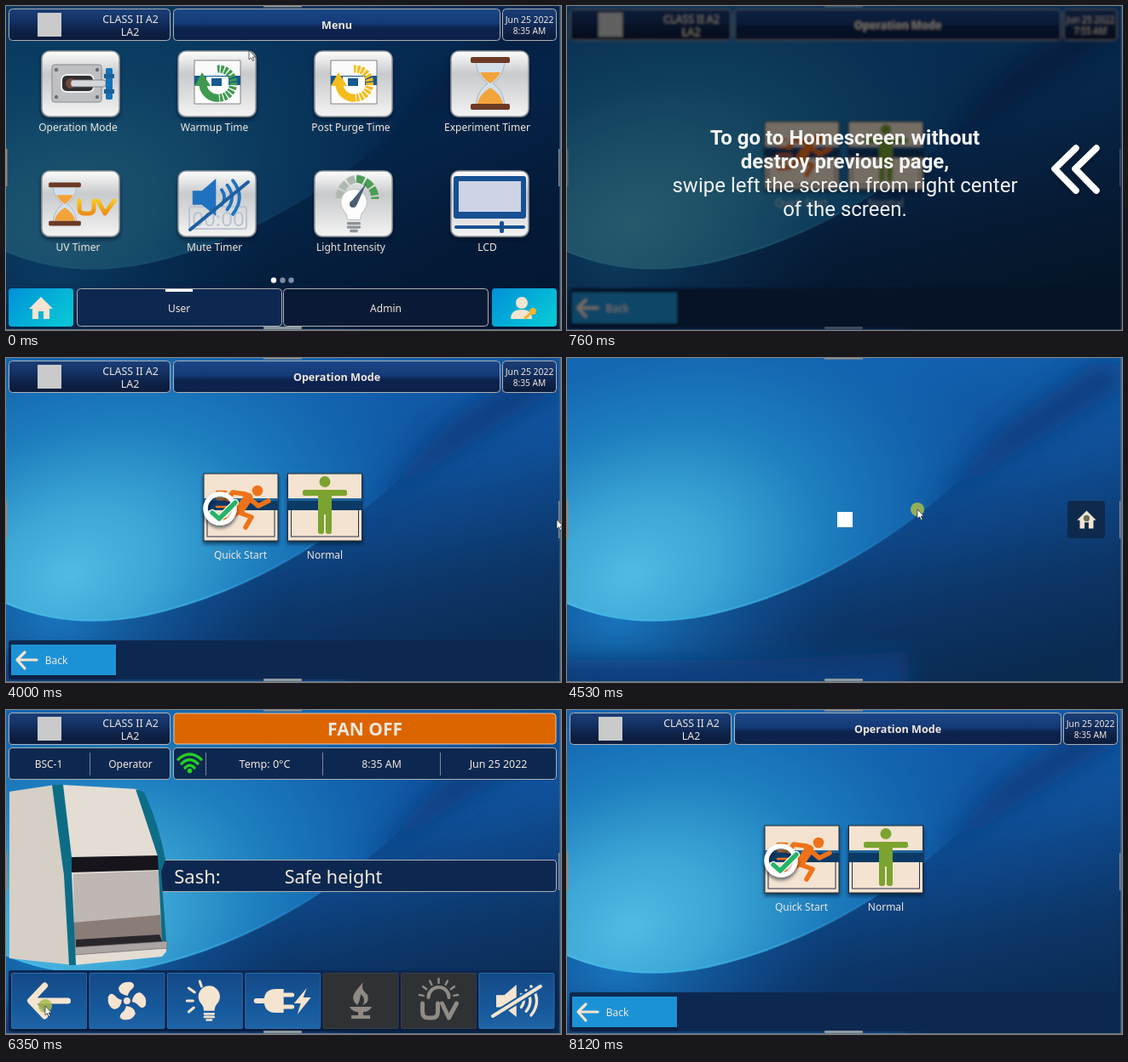
These frames come from a looping animation (651 px wide and 381 px high, 8.97 s). An HTML page:

```html
<!DOCTYPE html>
<html lang="en">
<head>
<meta charset="utf-8">
<title>Cabinet touch panel</title>
<style>
html, body { margin: 0; width: 100%; height: 100%; overflow: hidden; background: #0b2c55; }
svg { display: block; width: 651px; height: 381px; }
text { font-family: "Noto Sans", sans-serif; fill: #f1e8dc; white-space: pre; }
.message text { font-family: Roboto, sans-serif; fill: #f4f4f4; }
.line { fill: none; stroke-linecap: round; stroke-linejoin: round; }
</style>
</head>
<body>
<svg id="stage" viewBox="0 0 651 381" xmlns="http://www.w3.org/2000/svg"></svg>
<script>
const LOOP = 8970;
const CREAM = '#f5e4cf', NAVY = '#0d2850', BOLD = 'font-weight="700"';

// Drawing helpers, each returning SVG markup
const rect = (x, y, w, h, fill, extra = '') =>
  `<rect x="${x}" y="${y}" width="${w}" height="${h}" fill="${fill}" ${extra}/>`;
const circle = (x, y, r, fill, extra = '') => `<circle cx="${x}" cy="${y}" r="${r}" fill="${fill}" ${extra}/>`;
const shape = (d, fill, extra = '') => `<path d="${d}" fill="${fill}" ${extra}/>`;
const line = (d, color, width, extra = '') =>
  `<path class="line" d="${d}" stroke="${color}" stroke-width="${width}" ${extra}/>`;
const text = (x, y, s, size = 12, extra = '') =>
  `<text x="${x}" y="${y}" font-size="${size}" text-anchor="middle" ${extra}>${s}</text>`;
const group = (x, y, s, body) => `<g transform="translate(${x} ${y}) scale(${s})">${body}</g>`;
const panel = (x, y, w, h, fill = 'url(#bar)') =>
  rect(x + .5, y + .5, w - 1, h - 1, fill, 'rx="4" stroke="#aeb0b4"');
const gradient = (id, stops, attrs = 'x1="0" y1="0" x2="0" y2="1"', kind = 'linear') =>
  `<${kind}Gradient id="${id}" ${attrs}>` +
  stops.map(([o, c, a = 1]) => `<stop offset="${o}" stop-color="${c}" stop-opacity="${a}"/>`).join('') +
  `</${kind}Gradient>`;

const defs = `<defs>
${gradient('base', [[0, '#1267b8'], [.45, '#0f4f97'], [.75, '#0c3668'], [1, '#0a2a50']], 'x1=".35" y1="0" x2=".75" y2="1"')}
${gradient('glow', [[0, '#50bbe2'], [.25, '#3ba5d5'], [.52, '#1e7fbf'], [.78, '#1467b0', .9], [1, '#1262b2', 0]],
  'gradientUnits="userSpaceOnUse" cx="0" cy="0" r="1" gradientTransform="translate(75 255) rotate(-25) scale(450 310)"', 'radial')}
${gradient('rim', [[0, '#46b9e6'], [.5, '#38a9de', .8], [1, '#1c78c4', 0]], 'gradientUnits="userSpaceOnUse" x1="0" y1="0" x2="460" y2="0"')}
${gradient('floor', [[0, '#1a7cc4', .9], [1, '#0f4f98', 0]], 'gradientUnits="userSpaceOnUse" cx="60" cy="300" r="260"', 'radial')}
${gradient('night', [[0, '#00182a', .6], [.5, '#001428', .63], [1, '#001026', .72]], 'x1="0" y1="0" x2="1" y2=".3"')}
${gradient('bar', [[0, '#1b3f78'], [.3, '#153468'], [.7, '#0d2147'], [1, '#0b1b3b']])}
${gradient('title', [[0, '#1c4787'], [.45, '#143a76'], [.6, '#0c2350'], [1, '#0d2148']])}
${gradient('tile', [[0, '#fdfdfd'], [.35, '#c9cacc'], [.6, '#d8d9da'], [1, '#f4f4f4']])}
${gradient('aqua', [[0, '#0090d8'], [1, '#08c4d6']], 'x1="0" y1="0" x2="1" y2=".6"')}
${gradient('key', [[0, '#114a87'], [.6, '#17589b'], [1, '#1d64a6']])}
${gradient('gold', [[0, '#f7c623'], [1, '#ee8d12']])}
<filter id="soft" x="-50%" y="-90%" width="200%" height="280%"><feGaussianBlur stdDeviation="14"/></filter>
<filter id="blur"><feGaussianBlur stdDeviation="1.7"/></filter>
<filter id="shade" x="-20%" y="-20%" width="140%" height="150%"><feDropShadow dx="0" dy="3" stdDeviation="2" flood-color="#001028" flood-opacity=".65"/></filter>
</defs>`;

const RIM = 'M0 288C55 312 110 313 165 302C260 281 345 236 420 178';
const backdrop = rect(0, 0, 651, 381, 'url(#base)') +
  rect(0, 230, 340, 151, 'url(#floor)') +
  shape('M-60 420V352Q170 362 400 345V420Z', '#0b3e7c', 'filter="url(#soft)"') +
  shape(RIM + 'C480 132 545 55 610 0H0Z', 'url(#glow)') +
  line(RIM, 'url(#rim)', 2.5) +
  shape('M415 185L520 75L620 5L651 10V35Q520 115 415 185Z', '#0b3a7c', 'filter="url(#soft)" opacity=".85"');

const handles = rect(302, 0, 45, 1.5, '#95918b') + rect(302, 377, 45, 3, '#8b98a0', 'rx="1"') +
  rect(0, 168, 1.5, 44, '#95857c') + rect(648, 168, 1.5, 44, '#85909c') +
  rect(649.5, 0, 1.5, 381, '#5a7089') + rect(0, 380, 651, 1, '#66727f');

const brand = (x, y, size, color) => rect(x - size / 2, y - size / 2, size, size, color);
const device = panel(3, 3, 190, 38) + brand(51, 22, 28, '#cacaca') +
  text(146, 20, 'CLASS II A2', 12.4) + text(145.5, 35, 'LA2', 12.4);
const header = (title, time) => device + panel(196, 3, 384, 38, 'url(#title)') +
  text(388, 27, title, 12.6, BOLD) +
  panel(582, 3, 64, 38) + text(614, 20, 'Jun 25 2022', 10.4) + text(614, 33, time, 10.2);

const house = 'M-14 1L0 -13L14 1H10V13H3V4H-3V13H-10V1Z';

// Menu page
const hourglass = (x, y, s) => group(x, y, s,
  shape('M-17 -25H17Q15 -8 3 0Q15 8 17 25H-17Q-15 8 -3 0Q-15 -8 -17 -25Z', '#d3e0ea', 'stroke="#a9b4be"') +
  shape('M-12 -13H12Q9 -6 0 0Q-9 -6 -12 -13ZM0 5Q13 13 15 24H-15Q-13 13 0 5Z', '#f3a33a') +
  rect(-23, -31, 46, 7, '#6b3a24', 'rx="2"') + rect(-23, 24, 46, 7, '#6b3a24', 'rx="2"'));

const timer = (x, color) => group(x, 91, 1,
  rect(-27, -27, 54, 51, '#fbfbfb', 'stroke="#555" stroke-width=".7"') +
  rect(-27, -9, 54, 11, '#14598f') + rect(-13, -8, 26, 18, '#fff') + rect(-7, -6, 12, 9, '#14598f') +
  `<g fill="none" stroke="${color}" stroke-width="9"><path d="M-17 0A17 17 0 0 0 2 17"/>
   <path d="M3 17A17 17 0 0 0 0 -17" stroke-dasharray="3.2 1.4"/></g>` +
  shape('M-27 3L-18 -13L-8 3Z', color));

const bulb = (x, y, s, glass, cap) => group(x, y, s,
  shape('M-7 13Q-7 7 -11 3A14 14 0 1 1 11 3Q7 7 7 13Z', glass) +
  line('M-6 17H6M-6 21H6M-3 25H3', cap, 3));

const speaker = color => shape('M-22 -7H-12L3 -20V20L-12 8H-22Z', color) +
  line('M9 -8Q15 0 9 8M15 -13Q25 0 15 13M21 -18Q35 0 21 18', color, 3.5);

const menuArt = [
  rect(54, 69, 58, 44, '#bfc0c3', 'rx="3" stroke="#88898d"') +
    [59, 107].map(x => circle(x, 75, 2.2, '#6a6c70') + circle(x, 107, 2.2, '#6a6c70')).join('') +
    rect(65, 81, 38, 20, '#302d2f', 'rx="6" stroke="#eee" stroke-width="2"') + circle(76, 91, 6, '#75463a') +
    rect(76, 87, 41, 8, '#d5d7da', 'rx="3" stroke="#777" stroke-width=".8"') +
    rect(117, 73, 8, 37, '#1472b8', 'rx="2"') + rect(115, 80, 12, 5, '#1d5f98') + rect(115, 98, 12, 5, '#1d5f98'),
  timer(248, '#3f9a50'), timer(408, '#f5bd1c'), hourglass(568, 91, 1),
  hourglass(69, 233, .82) + line('M86 229V238Q86 244 92 244H97Q103 244 103 238V229M108 229L116 244L127 229', 'url(#gold)', 5),
  text(249, 259, '00:00', 24, 'font-family="DejaVu Sans Mono, monospace" style="fill:#b8c2d0"') +
    rect(215, 236, 67, 26, 'none', 'rx="3" stroke="#bcc4d2" stroke-width="2"') +
    group(243, 225, 1.1, speaker('#1f72c0')) + line('M216 263L284 207', '#1d5f9f', 4),
  `<path d="M391 226A24 24 0 0 1 411 203" fill="none" stroke="#aeb9b0" stroke-width="9" stroke-dasharray="9 2"/>
   <path d="M411 203A24 24 0 0 1 433 227" fill="none" stroke="#4b9d54" stroke-width="9" stroke-dasharray="9 2"/>` +
    `<g stroke="#b4b8bc" stroke-width=".8">${bulb(408, 237, 1.1, '#fdfdfd', '#8d9298')}</g>` +
    shape('M404 231L423 208L411 235Z', '#4a5d72') + circle(407, 233, 4, '#4a5d72'),
  rect(525, 200, 85, 50, '#165092', 'rx="3"') + rect(531, 206, 73, 36, '#cfd3e6') +
    rect(526, 258, 83, 4, '#165092', 'rx="2"') + rect(579, 253, 5, 14, '#165092', 'rx="2"')
];
const menuLabels = ['Operation Mode', 'Warmup Time', 'Post Purge Time', 'Experiment Timer',
  'UV Timer', 'Mute Timer', 'Light Intensity', 'LCD'];
const menuPage = header('Menu', '8:35 AM') + menuLabels.map((label, i) => {
  const x = 42 + i % 4 * 160, y = i < 4 ? 53 : 194;
  return rect(x, y, 91, 77, 'url(#tile)', 'rx="9" stroke="#8f9298" stroke-width="1.5" filter="url(#shade)"') +
    menuArt[i] + text(x + 42.5, y + 94, label);
}).join('') +
  [314, 324.5, 334.5].map((x, i) => circle(x, 322.5, 3.2, i ? '#7d8ea4' : '#fff')).join('') +
  rect(3, 332, 76, 45, 'url(#aqua)', 'rx="4"') + group(41, 355, 1, shape(house, CREAM)) +
  panel(83, 332, 241, 45, NAVY) + rect(187, 333, 32, 3, '#fff') + text(203, 360, 'User') +
  panel(325, 332, 241, 45, '#0a1a36') + text(445.5, 360, 'Admin') +
  rect(570, 332, 76, 45, 'url(#aqua)', 'rx="4"') + circle(605, 349, 7, CREAM) +
  shape('M592 368Q592 357 605 357Q617 357 617 368Z', CREAM) +
  line('M609 367L617 360', '#f2b32c', 3) + circle(618, 359, 4, '#f2b32c');

// Operation mode page
const modeTile = x => rect(x, 136, 87, 79, '#f3e3d0', 'stroke="#26282e" filter="url(#shade)"') +
  rect(x + 4, 172, 79, 38, 'none', 'stroke="#26304a"') +
  rect(x, 165, 87, 14, '#0c3a66') + rect(x, 165, 87, 3, '#1d639c');
const runner = circle(295, 156, 6.3, '#ee7219') +
  line('M284 164L274 179', '#ee7219', 11) +
  line('M285 165L296 174L308 168M281 160L266 158L260 166M274 182L288 187L281 199M271 182L261 190L249 191', '#ee7219', 5.5) +
  line('M247 157H258M248 166H264M247 175H263M247 184H258', '#ee7219', 2.5);
const man = circle(374, 145.5, 6.5, '#7ba32f') + rect(348, 155, 52, 7, '#7ba32f', 'rx="2.5"') +
  rect(366, 155, 16, 29, '#7ba32f', 'rx="2"') + rect(366, 178, 7, 29, '#7ba32f', 'rx="3"') +
  rect(375, 178, 7, 29, '#7ba32f', 'rx="3"');
const check = circle(251, 177, 17, 'none', 'stroke="#fff" stroke-width="5.5" filter="url(#shade)"') +
  line('M242 182L250 189L269 170', '#fff', 8) + line('M242 182L250 189L269 170', '#25b468', 5.5);
const modePage = (time, mark) => header('Operation Mode', time) +
  modeTile(232) + runner + mark + modeTile(330.5) + man +
  text(275, 236, 'Quick Start') + text(374, 236, 'Normal') +
  rect(3, 332, 643, 46, NAVY, 'rx="3"') + rect(6, 337, 123, 36, '#1f92d6', 'filter="url(#shade)"') +
  line('M36 355H13M22 346L13 355L22 365', CREAM, 3.2) + text(59, 360, 'Back');

// Home page
const cabinet = shape('M4 96L57 88L76 180L80 300L4 292Z', '#d5cfc6') +
  shape('M66 88L154 93L180 172L188 284L183 290L80 300Z', '#e4ddd4') +
  shape('M77 173L181 171V188L77 191Z', '#17151b') +
  shape('M79 193L181 189L184 275L80 283Z', '#beb7b3') +
  shape('M79 250L181 241L184 275L80 283Z', '#8a7d78') +
  shape('M82 270L180 264L184 274L82 282Z', '#29262b') +
  shape('M80 279L189 272V280L80 288Z', '#aaa5a2', 'stroke="#6d696b" stroke-width=".7"') +
  shape('M54 88H67L77 173V192L82 300H74L68 194L66 180Z', '#0d6c86') +
  shape('M152 93L162 97Q178 130 187 176L182 190L188 272H183L179 190L178 172Z', '#0d6c86');

const keyIcons = [
  c => line('M22 0H-20M-5 -18L-22 0L-5 18', c, 7),
  c => [0, 90, 180, 270].map(a => `<g transform="rotate(${a})">` +
    shape('M1 -6Q-9 -7 -10 -15Q-6 -24 5 -22Q11 -19 6 -14Q2 -11 1 -6Z', c) + '</g>').join('') + circle(0, 0, 4, c),
  c => bulb(5, 0, .9, c, c) + line('M-21 0H-14M-19 -15L-12 -10M-19 13L-13 8M-6 -23L-4 -17', c, 3),
  c => line('M-31 0H-22', c, 6) + shape('M-22 0Q-22 -14 -8 -14H1V14H-8Q-22 14 -22 0Z', c) +
    line('M1 -7H11M1 7H11', c, 5) + shape('M28 -15L13 3H21L17 16L33 -4H24Z', c),
  c => shape('M3 -22Q-1 -14 8 -7Q11 2 2 5Q7 -2 0 -8Q-1 1 -4 5Q-11 0 -8 -8Q-5 -13 3 -22Z', c) +
    shape('M-13 7H13Q10 13 3 13V17H11V21H-11V17H-3V13Q-10 13 -13 7Z', c),
  c => line('M-12 -4A12 12 0 0 1 12 -4', c, 4) +
    [-80, -53, -27, 0, 27, 53, 80].map(a => line('M0 -18V-23', c, 2.5, `transform="translate(0 -3) rotate(${a})"`)).join('') +
    line('M-19 3V13Q-19 20 -12 20H-8Q-1 20 -1 13V3M4 3L12 20L21 3', c, 5),
  c => group(-3, 0, .95, speaker(c)) + line('M-28 18L28 -17', '#17589b', 8) + line('M-28 18L28 -17', c, 4)
];
const homePage = device + rect(197, 4, 448, 36, '#dc6500', 'rx="4" stroke="#e9c5a0"') +
  text(421, 30, 'FAN OFF', 21, BOLD) +
  panel(3, 44, 190, 38, NAVY) + panel(196, 44, 450, 38, NAVY) +
  [98, 234, 371, 509].map(x => rect(x, 50, 1, 27, '#7e8796')).join('') +
  text(50, 68, 'BSC-1') + text(146, 68, 'Operator') + text(303.5, 68, 'Temp: 0°C', 12.6) +
  text(440.5, 68, '8:35 AM', 12.3) + text(577.5, 68, 'Jun 25 2022', 12.4) +
  line('M202 58Q215.500 46 229 58M206 63Q215.500 54 225 63M210 68Q215.500 62 221 68', '#24cf22', 3.4) +
  circle(215.5, 71.5, 2.8, '#24cf22') +
  panel(180, 176, 466, 38, NAVY) + text(224.5, 204, 'Sash:', 22) + text(384, 204, 'Safe height', 21.6) + cabinet +
  rect(3, 306, 643, 72, '#0b2855', 'rx="3"') +
  keyIcons.map((icon, i) => {
    const off = i === 4 || i === 5, x = 6.5 + i * 91.4;
    return rect(x, 309.5, 88, 65, off ? '#2d3036' : 'url(#key)', `rx="2" stroke="${off ? '#3a3d42' : '#2f6dab'}" filter="url(#shade)"`) +
      group(x + 44, 342, 1, icon(off ? '#8f8a83' : CREAM));
  }).join('');

// Hint card
const hint = backdrop + `<g filter="url(#blur)">${modePage('7:55 AM', '')}</g>` +
  rect(0, 0, 651, 381, '#000', 'opacity=".52"') + handles.replace(/<rect/g, '<rect opacity=".4"') +
  '<g class="message">' +
  text(326, 163, 'To go to Homescreen without', 24, BOLD) +
  text(326, 191, 'destroy previous page,', 24, BOLD) +
  text(326, 219, 'swipe left the screen from right center', 24) +
  text(326, 247, 'of the screen.', 24) + '</g>' +
  line('M597 167L572 191.500L597 217M621 167L596 191.500L621 217', '#fff', 7.5, 'filter="url(#shade)"');

const stage = document.getElementById('stage');
const layer = (id, body) => `<g id="${id}">${body}</g>`;
stage.innerHTML = defs + backdrop +
  layer('dim', rect(0, 0, 651, 381, 'url(#night)')) +
  layer('splash', brand(326, 190, 18, '#fff')) +
  layer('menu', menuPage) + layer('mode', modePage('8:35 AM', check)) + layer('home', homePage) +
  layer('dock', rect(587, 168, 44, 44, '#0d2a4d', 'rx="4"') +
    group(609.5, 190, .8, shape(house, CREAM) + circle(0, -2, 4.5, '#65705a'))) +
  handles +
  layer('pointer', circle(0, 0, 8, '#a9ba4c', 'id="press" opacity=".85"') +
    shape('M0 0V11L2.500 8.700L4.300 12.500L6 11.700L4.300 8H7.500Z', '#fff', 'stroke="#222" stroke-width=".7"')) +
  layer('hint', hint);
const el = id => document.getElementById(id);

const ramp = (t, a, b) => Math.min(1, Math.max(0, (t - a) / (b - a)));
const within = (t, ...spans) => spans.some(([a, b]) => t >= a && t < b);
const show = (id, on) => el(id).setAttribute('visibility', on ? 'visible' : 'hidden');

// Pages arrive by shrinking from a slight zoom and leave by growing again
function pose(id, presence) {
  const scale = 1 + .2 * (1 - presence) ** 2, alpha = Math.min(1, presence * 1.5);
  const page = el(id);
  page.setAttribute('transform', `translate(325.5 190.5) scale(${scale}) translate(-325.5 -190.5)`);
  page.setAttribute('opacity', alpha);
  show(id, alpha > 0);
  return alpha;
}

const POINTER = [[0, 285, 52], [80, 285, 52], [380, 95, 95], [620, 95, 95], [760, 150, 108],
  [3260, 427, 152], [3320, 427, 152], [3920, 646, 190], [4230, 646, 190], [4500, 411, 178],
  [5130, 411, 178], [5370, 209, 241], [5810, 46, 348], [6630, 46, 348], [7170, 190, 395], [LOOP, 190, 395]];
function pointerAt(t) {
  const i = POINTER.findIndex(p => p[0] > t);
  const [t0, x0, y0] = POINTER[i - 1], [t1, x1, y1] = POINTER[i];
  const k = ramp(t, t0, t1);
  return [x0 + (x1 - x0) * k, y0 + (y1 - y0) * k];
}

function draw(t) {
  const menu = pose('menu', 1 - ramp(t, 460, 560));
  const mode = pose('mode', t < 4000 ? ramp(t, 560, 720) : t < 6000 ? 1 - ramp(t, 4230, 4480) : ramp(t, 6450, 6595));
  const home = pose('home', t < 6000 ? ramp(t, 4610, 4950) : 1 - ramp(t, 6350, 6460));
  el('dim').setAttribute('opacity', menu);
  el('splash').setAttribute('opacity', Math.max(0, 1 - menu - mode - home));
  show('dock', within(t, [4230, 4680]));
  el('dock').setAttribute('transform', `translate(${64 * (1 - ramp(t, 4230, 4420))} 0)`);
  const [x, y] = pointerAt(t);
  el('pointer').setAttribute('transform', `translate(${x} ${y})`);
  show('press', within(t, [380, 480], [4230, 4610], [6350, 6450]));
  show('hint', within(t, [760, 3260]));
}

const start = performance.now();
(function tick() {
  draw((performance.now() - start) % LOOP);
  requestAnimationFrame(tick);
})();
</script>
</body>
</html>
```
